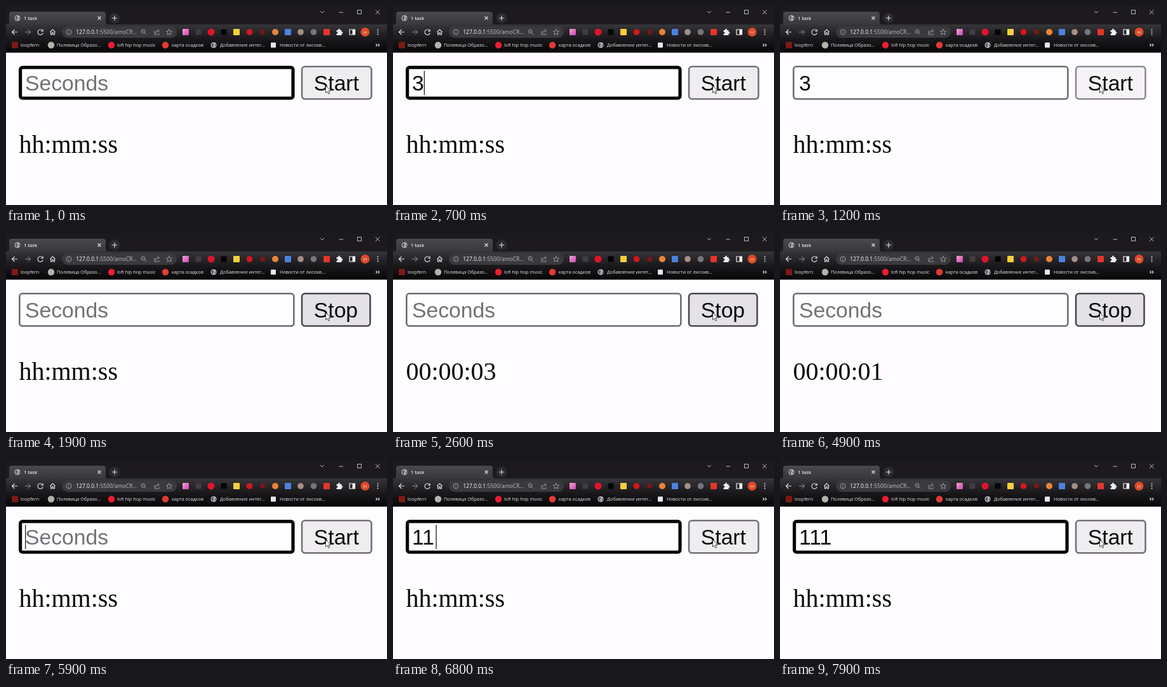
Recreate the animation shown at these times as an HTML page. Size 600 px wide and 313 px high, loop 8 s.

```html
<!DOCTYPE html>
<html lang="en">
<head>
<meta charset="utf-8">
<title>1 task</title>
<style>
  html, body { margin: 0; width: 100%; height: 100%; overflow: hidden; background: #fefcff; }
  svg { display: block; }
  text { white-space: pre; }
  .ui { font-family: "Open Sans", "Noto Sans", sans-serif; font-size: 7.3px; fill: #e8e6e9; }
  .form { font: 33.7px "Liberation Sans", Arial, sans-serif; }
  .clock { font: 40px "Liberation Serif", "Times New Roman", serif; }
  .line { fill: none; stroke: #e6e4e7; stroke-width: 1.1; }
  .thin { stroke-width: .8; }
  .dim { stroke: #a5a3a8; stroke-width: .9; }
</style>
</head>
<body>
<svg width="600" height="313" viewBox="0 0 600 313">
  <defs>
    <linearGradient id="tabFill" x2="0" y2="1">
      <stop stop-color="#4a494d"/><stop offset="1" stop-color="#38373b"/>
    </linearGradient>
    <linearGradient id="barFill" x2="0" y2="1">
      <stop stop-color="#363539"/><stop offset=".5" stop-color="#1b191c"/><stop offset="1" stop-color="#070608"/>
    </linearGradient>
    <linearGradient id="pink" x2="1" y2="1">
      <stop stop-color="#f7a1cf"/><stop offset="1" stop-color="#c747b5"/>
    </linearGradient>
    <g id="globe">
      <circle r="4.6" fill="#bab9be"/>
      <path d="M-3.6-1.5L-.8-3.4L.6-1.6L-1 .2L.2 2.2L-1.2 3.6Q-3.6 2-3.6-1.5M1.6-.6L3.6-1.4Q4.2 1.2 2.2 3Z" fill="#55545a"/>
    </g>
  </defs>

  <rect width="600" height="30" fill="#1c1a1d"/>
  <rect y="29" width="600" height="44" fill="url(#barFill)"/>
  <path d="M1 29.5Q5 29.5 5 25V13Q5 9 9 9H153Q157 9 157 13V25Q157 29.5 161 29.5Z" fill="url(#tabFill)"/>
  <use href="#globe" x="18" y="19"/>
  <text class="ui" x="28" y="21.6" style="font-size:7.4px;font-weight:600">1 task</text>
  <circle cx="171" cy="19" r="8.5" fill="#2c2a2d"/>
  <path class="line" d="M144.5 16.5l5 5m0-5l-5 5M167 19h8m-4-4v8"/>
  <path class="line thin" d="M495 8l3 3l3-3M524.5 10h6.500M553.500 6.500h6v6h-6zM582 6.500l6.500 6.500m0-6.500l-6.500 6.500"/>

  <path class="line" d="M18 41H9.500m4-4l-4 4l4 4M57.500 38.500A4.200 4.200 0 1 0 58.200 42.500M58.200 36.800V39.700H55M69.500 41L73.500 37L77.500 41M70.500 40.500V45H72.500V42H74.500V45H76.500V40.500"/>
  <path class="line dim" d="M30 41h8.500m-4-4l4 4l-4 4"/>
  <rect x="88" y="32" width="181" height="18" rx="9" fill="#3a393d"/>
  <g class="line dim">
    <circle cx="99" cy="41" r="4"/>
    <path d="M99 40.500v2.700m0-4.700v1"/>
    <circle cx="216" cy="40" r="3"/>
    <path d="M218.200 42.200l3 3M214.500 40h3M234 39v6h7v-2M235.500 43q.3-4 5-4m-2-2.500l2.800 2.500l-2.800 2.500"/>
    <path d="M257 36.500l1.300 3l3.300.3l-2.500 2.200l.8 3.200l-2.900-1.700l-2.900 1.700l.8-3.200l-2.500-2.200l3.300-.3z"/>
  </g>
  <text class="ui" x="110.200" y="44" style="font-size:8.500px"><tspan fill="#fff">127.0.0.1</tspan><tspan fill="#c2c0c5">:5500/amoCR...</tspan></text>

  <g id="extensions"></g>
  <path d="M516.500 38h2.500q0-2.500 1.500-2.500t1.500 2.500h2.500v2.500q2 0 2 1.500t-2 1.500v2.500h-8v-2.500q2 0 2-1.500t-2-1.500z" transform="translate(4)" fill="#eeecef"/>
  <path d="M541 37h8.500v8h-8.500z" fill="none" stroke="#f4f3f5" stroke-width="1.200"/>
  <path d="M545.500 37h4v8h-4z" fill="#f4f3f5"/>
  <circle cx="565.500" cy="41" r="7" fill="#df4a26"/>
  <text class="ui" x="565.500" y="43.700" text-anchor="middle">H</text>
  <g fill="#e2e1e4"><circle cx="585.500" cy="37.500" r="1"/><circle cx="585.500" cy="41" r="1"/><circle cx="585.500" cy="44.500" r="1"/></g>

  <g id="bookmarks" class="ui"></g>
  <path class="line" d="M582.500 59.500l2 2l-2 2m3.500-4l2 2l-2 2"/>

  <rect y="73" width="600" height="240" fill="#fefcff"/>
  <rect y="73" width="600" height="1" fill="#9a949a"/>
  <rect id="field" fill="#fefdff"/>
  <text id="entry" class="form" x="30" y="132.600"></text>
  <rect id="caret" y="102" width="1.300" height="38" fill="#222"/>
  <rect id="button" x="466" y="95.300" height="51" rx="5" stroke-width="2.600"/>
  <text id="label" class="form" x="484.800" y="132.600" fill="#0b0a0c"></text>
  <text id="clock" class="clock" x="20.400" y="231.400" fill="#0b0a0c"></text>
  <path d="M503.500 125.500v11.200l2.600-2.400l1.700 3.900l1.800-.8l-1.700-3.800h3.500z" fill="#fff" stroke="#222" stroke-width=".8"/>
</svg>
<script>
const $ = id => document.getElementById(id);
const set = (id, attrs) => Object.entries(attrs).forEach(([k, v]) => $(id).setAttribute(k, v));

const square = (x, y, size, fill) =>
  `<rect x="${x - size / 2}" y="${y - size / 2}" width="${size}" height="${size}" rx="1" fill="${fill}"/>`;
const disc = (x, y, r, fill) => `<circle cx="${x}" cy="${y}" r="${r}" fill="${fill}"/>`;

$('extensions').innerHTML = [
  [square, 283, 10, 'url(#pink)'], [square, 303, 9, '#3f3d41'],
  [disc, 323, 5.5, '#e0142c'], [square, 343, 9, '#050505'],
  [square, 363, 10, '#f5cf3c'], [disc, 383.5, 4.8, '#d3181c'],
  [square, 404, 7, '#7c1719'], [disc, 424, 5, '#e8843a'],
  [square, 444, 10, '#4a82df'], [disc, 464, 4.8, '#a58f86'],
  [disc, 484.5, 4.8, '#77757b'], [square, 505, 10, '#e5342c']
].map(([shape, x, size, fill]) => shape(x, 41, size, fill)).join('');

const bookmark = (icon, x, name) => icon + `<text x="${x}" y="64.200">${name}</text>`;
$('bookmarks').innerHTML =
  bookmark(square(14, 61.5, 10, '#7d1a16'), 23, 'loopfern') +
  bookmark(disc(71, 61.5, 5.2, '#b5b4ab'), 80, 'Полевица Образо...') +
  bookmark(disc(166, 61.5, 5.2, '#ee1c32'), 175, 'lofi hip hop music') +
  bookmark(disc(251, 61.5, 5.2, '#e33a32'), 261, 'карта осадков') +
  bookmark('<use href="#globe" x="327" y="61.500"/>', 337, 'Добавление интег...') +
  bookmark(square(421, 61.5, 8, '#e8e6ea'), 431, 'Новости от лисохв...');

// Moments of the scene, in ms
const LOOP = 8000, TYPE = 600, PRESS = 1100, RELEASE = 1300, TICK = 2300, RESET = 5700,
      RETYPE = 6600, KEY_GAP = 200;

function typed(t) {
  if (t >= RETYPE) return '1'.repeat(Math.min(3, 1 + Math.floor((t - RETYPE) / KEY_GAP)));
  return t >= TYPE && t < RELEASE ? '3' : '';
}

function lastInput(t) {
  if (t < TYPE) return -700;
  if (t < RESET) return TYPE;
  return t < RETYPE ? RESET : Math.min(t, RETYPE + 2 * KEY_GAP);
}

function draw() {
  const t = performance.now() % LOOP;
  const focused = t < PRESS || t >= RESET;
  const pressed = t >= PRESS && t < RELEASE;
  const running = t >= RELEASE && t < RESET;
  const value = typed(t);

  const line = focused ? 5.2 : 2.6;
  set('field', {
    x: 20 + line / 2, y: 94 + line / 2, width: 434.6 - line, height: 53.6 - line,
    rx: focused ? 3.5 : 4.5, stroke: focused ? '#080708' : '#6e6c71', 'stroke-width': line
  });
  $('entry').textContent = value || 'Seconds';
  set('entry', { fill: value ? '#0b0a0c' : '#747276' });
  set('caret', {
    x: 30 + value.length * 18.7,
    visibility: focused && (t - lastInput(t)) % 1000 < 500 ? 'visible' : 'hidden'
  });

  set('button', {
    width: running ? 107.5 : 109.5,
    fill: pressed ? '#f5f3f6' : running ? '#e4e2e6' : '#efedf0',
    stroke: pressed ? '#8d8b90' : running ? '#4b484e' : '#747277'
  });
  $('label').textContent = running ? 'Stop' : 'Start';
  $('clock').textContent = t >= TICK && t < RESET
    ? '00:00:0' + (3 - Math.floor((t - TICK) / 1000)) : 'hh:mm:ss';
  requestAnimationFrame(draw);
}
draw();
</script>
</body>
</html>
```
